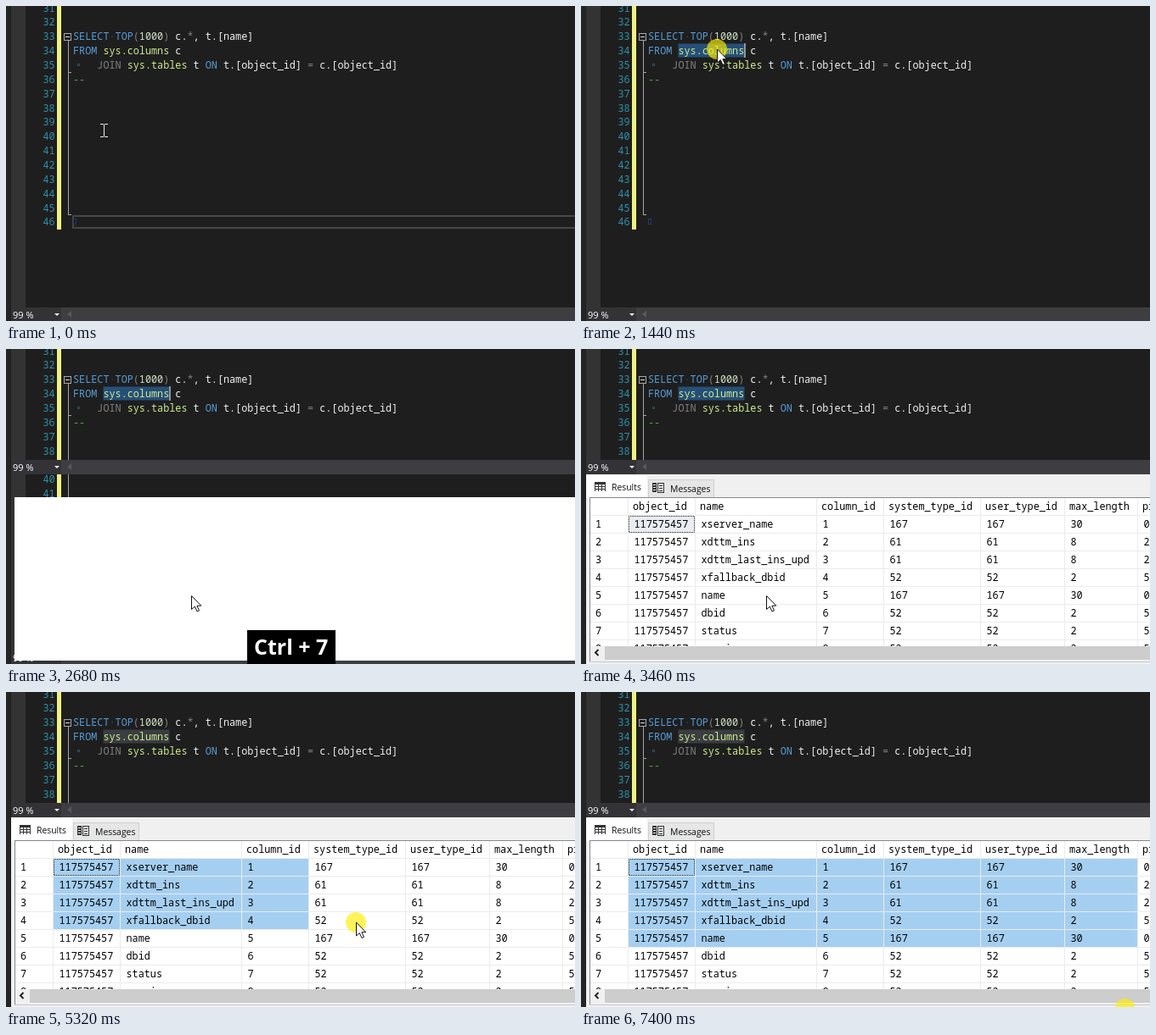
Recreate the animation shown at these times as an HTML page with a canvas. Size 670 by 372 pixels, loop 7.46 s.

```html
<!DOCTYPE html>
<html lang="en">
<head>
<meta charset="utf-8">
<title>Run selected query</title>
<style>
html, body { margin: 0; width: 100%; height: 100%; overflow: hidden; background: #1e1e1e; }
canvas { display: block; }
</style>
</head>
<body>
<canvas id="stage" width="670" height="372"></canvas>
<script>
const ctx = document.getElementById('stage').getContext('2d');
const LOOP = 7460, W = 670, H = 372;
const MONO = '11.8px "Noto Sans Mono", monospace';
const UI = '"Open Sans", sans-serif';

const BLUE = '#569cd6', GREY = '#808080', PLAIN = '#f0f0f0', OBJECT = '#cdeb8b';
const CODE = {
  33: [['SELECT', BLUE], ['·', '#2f4f5a'], ['TOP', BLUE], ['(', GREY], ['1000', '#d3e3c8'], [')', GREY],
       [' c.', PLAIN], ['*', GREY], [', t.[name]', PLAIN]],
  34: [['FROM ', BLUE], ['sys.columns', OBJECT], [' c', PLAIN]],
  35: [['    JOIN ', GREY], ['sys.tables', OBJECT], [' t ', PLAIN], ['ON ', BLUE],
       ['t.[object_id] ', PLAIN], ['= ', GREY], ['c.[object_id]', PLAIN]],
  36: [['--', '#57a64a']]
};

const COLUMN_X = [55, 134, 277, 356, 470, 569, 655];
const HEADERS = ['object_id', 'name', 'column_id', 'system_type_id', 'user_type_id', 'max_length', 'precision'];
const FIELDS = [
  ['xserver_name', 167, 30, 0], ['xdttm_ins', 61, 8, 23], ['xdttm_last_ins_upd', 61, 8, 23],
  ['xfallback_dbid', 52, 2, 5], ['name', 167, 30, 0], ['dbid', 52, 2, 5], ['status', 52, 2, 5], ['version', 52, 2, 5]
];
const ROW_TOP = 196, ROW_H = 21;

// Pointer moves: start, end, steps, target x, target y
const MOVES = [
  [70, 740, 10, 119, 52], [820, 820, 1, 125, 52], [1050, 1200, 3, 160.5, 51],
  [1820, 2450, 9, 218.5, 291.5], [4180, 4550, 6, 161.5, 256], [4630, 4710, 2, 105, 207],
  [4780, 4860, 2, 150, 222], [4940, 5320, 5, 412.5, 272], [5420, 5570, 3, 584, 298],
  [6610, 6700, 2, 583, 298], [7000, 7230, 4, 641, 374]
];
const CLICKS = [[1280, 1740], [4780, 5800], [7400, LOOP]];
// Grid selection: time, columns, rows
const PICKS = [[4780, 1, 1], [4860, 2, 2], [5020, 2, 3], [5170, 3, 4], [5420, 4, 4], [5490, 5, 5], [5570, 6, 5]];
const CARET_ON = [[1440, 1970], [2450, 3460], [4010, 4540]];

const within = (t, spans) => spans.some(([a, b]) => t >= a && t < b);

function rect(x, y, w, h, color) {
  ctx.fillStyle = color;
  ctx.fillRect(x, y, w, h);
}

function text(value, x, y, color, font = MONO) {
  ctx.font = font;
  ctx.fillStyle = color;
  ctx.fillText(value, x, y);
  return x + ctx.measureText(value).width;
}

function poly(points, fill, stroke) {
  ctx.beginPath();
  points.forEach(([x, y]) => ctx.lineTo(x, y));
  ctx.closePath();
  if (fill) { ctx.fillStyle = fill; ctx.fill(); }
  if (stroke) { ctx.strokeStyle = stroke; ctx.lineWidth = 1; ctx.stroke(); }
}

function frame(x, y, w, h, color, width = 1) {
  ctx.strokeStyle = color;
  ctx.lineWidth = width;
  ctx.strokeRect(x, y, w, h);
}

function pointerAt(t) {
  let x = 114.5, y = 147;
  for (const [start, end, steps, toX, toY] of MOVES) {
    if (t < start) break;
    const step = t >= end ? steps : Math.floor((t - start) / (end - start) * (steps - 1)) + 1;
    x += (toX - x) * step / steps;
    y += (toY - y) * step / steps;
  }
  return [x, y];
}

function drawStatusBar(y) {
  rect(6, y, 59, 17, '#333337');
  rect(65, y, W - 65, 17, '#3e3e42');
  text('99 %', 8, y + 12.5, '#fff', '11px ' + UI);
  poly([[57, y + 7], [63, y + 7], [60, y + 10]], '#f1f1f1');
  poly([[77, y + 4], [77, y + 12], [72, y + 8]], '#58585c');
}

function drawEditor(t) {
  rect(0, 0, W, H, '#1e1e1e');
  rect(0, 0, 5, H, '#252526');
  rect(6, 0, 17, H, '#333333');
  rect(60, 0, 5, 264, '#eff284');

  if (t < 1280) frame(79, 248, 700, 14, '#464646', 2);
  else if (t < 1440) frame(79, 45, 700, 15, '#464646', 2);
  if (t >= 1440) rect(114.5, 44.5, 78, 16, t < 4780 ? '#264f78' : '#3a3d41');

  for (let n = 31; n <= 46; n++) {
    const y = 40.3 + (n - 33) * 16.85;
    text(n, 43.5, y, '#2b91af');
    let x = 79;
    for (const [part, color] of CODE[n] || []) x = text(part, x, y, color);
  }
  frame(84.5, 68.5, 2, 2, '#2f4f5a');
  frame(79.5, 251.5, 3, 6, '#223a66');

  const outline = '#a5a5a5';
  rect(73, 41, 1, 206, outline);
  rect(73, 78, 4, 1, outline);
  rect(73, 246, 4, 1, outline);
  rect(68, 32, 9, 9, '#1e1e1e');
  frame(68.5, 32.5, 8, 8, outline);
  rect(70, 36, 5, 1, '#dcdcdc');

  if (within(t, CARET_ON)) rect(192.5, 44, 1, 17, '#fff');
  drawStatusBar(356);
}

function drawTabs() {
  rect(6, 148, W, H, '#f0f0f0');
  rect(79, 154, 78, 21, '#e6e6e6');
  frame(79.5, 154.5, 77, 21, '#d0d0d0');
  rect(6, 150, 72, 26, '#fff');
  text('Results', 36, 167, '#111', '10.4px ' + UI);
  text('Messages', 105, 169, '#111', '10.4px ' + UI);

  rect(16, 157, 13, 11, '#333');
  for (let i = 0; i < 9; i++) rect(17 + i % 3 * 4, 160 + Math.floor(i / 3) * 3, 3, 2, '#fff');

  rect(84, 158, 5, 11, '#333');
  for (let i = 0; i < 3; i++) rect(85, 160 + i * 3, 3, 1, '#fff');
  frame(90.5, 158.5, 7, 11, '#333');
  for (let i = 0; i < 3; i++) rect(92, 161 + i * 3, 4, 1, '#333');
}

function drawGrid(t) {
  rect(10, 175, W, 193, '#fff');
  ctx.save();
  ctx.beginPath();
  ctx.rect(10, 175, W, 176);
  ctx.clip();

  const [, cols, rows] = PICKS.findLast(p => t >= p[0]) || [0, 0, 0];
  rect(56, 197, 78, 20, '#e9edf1');
  if (cols) rect(56, 197, COLUMN_X[cols] - 56, rows * ROW_H - 1, '#a5cff1');

  const line = '#ebebeb';
  COLUMN_X.forEach(x => rect(x, 176, 1, 176, line));
  for (let r = 0; r <= FIELDS.length; r++) rect(10, ROW_TOP + r * ROW_H, W, 1, line);

  HEADERS.forEach((name, c) => text(name, COLUMN_X[c] + 6, 190.2, '#000'));
  FIELDS.forEach(([name, type, length, precision], r) => {
    const y = ROW_TOP + 14.6 + r * ROW_H;
    text(r + 1, 17, y + .7, '#000');
    [117575457, name, r + 1, type, type, length, precision]
      .forEach((value, c) => text(value, COLUMN_X[c] + 7.5, y, '#000'));
  });

  ctx.setLineDash([1, 1]);
  ctx.lineDashOffset = .5;
  frame(56.5, 197.5, 77, 19, '#222');
  ctx.restore();

  rect(10, 351, W, 16, '#f0f0f0');
  rect(28, 351, W, 16, '#cdcdcd');
  ctx.beginPath();
  ctx.moveTo(20.5, 355);
  ctx.lineTo(17, 358.5);
  ctx.lineTo(20.5, 362);
  ctx.strokeStyle = '#222';
  ctx.lineWidth = 2;
  ctx.stroke();
  rect(10, 367, W, 5, '#f0f0f0');
  rect(10, 369, W, 1, '#c8c8c8');
  rect(10, 175, W, 1, '#828790');
  rect(10, 175, 1, 194, '#828790');
}

function drawKeys(label) {
  ctx.font = 'bold 25px ' + UI;
  const width = ctx.measureText(label).width, left = 335.7 - width / 2;
  rect(Math.round(left - 8.5), 332, Math.round(width + 17), 40, '#000');
  text(label, left, 361, '#fff', ctx.font);
}

function drawPointer(t) {
  const [x, y] = pointerAt(t);
  if (within(t, CLICKS)) {
    ctx.beginPath();
    ctx.arc(x - .5, y, 12, 0, Math.PI * 2);
    ctx.fillStyle = 'rgba(255,238,0,.66)';
    ctx.fill();
  }
  const overSelection = t >= 1440 && x > 114 && x < 193 && y < 61;
  if (t >= 2610 || overSelection) {
    const shape = [[0, 0], [0, 16], [3.8, 12.6], [6.5, 18.5], [9, 17.4], [6.4, 11.7], [11.3, 11.7]];
    poly(shape.map(([dx, dy]) => [x + dx, y + dy]), '#fff', '#111');
  } else {
    const left = Math.round(x), top = Math.round(y) - 8;
    rect(left, top + 1, 1, 14, '#eee');
    for (const edge of [top, top + 15]) {
      rect(left - 4, edge, 4, 1, '#eee');
      rect(left + 1, edge, 4, 1, '#eee');
    }
  }
}

function draw(t) {
  drawEditor(t);
  if (t >= 2610) drawStatusBar(131);
  if (t >= 3010) drawTabs();
  if (t >= 3080) drawGrid(t);
  else if (t >= 2680) rect(10, 175, W, 193, '#fff');
  if (t >= 2300 && t < 3460) drawKeys(t < 2540 ? 'Ctrl' : 'Ctrl + 7');
  drawPointer(t);
}

const begin = performance.now();
function tick() {
  draw((performance.now() - begin) % LOOP);
  requestAnimationFrame(tick);
}
tick();
</script>
</body>
</html>
```
